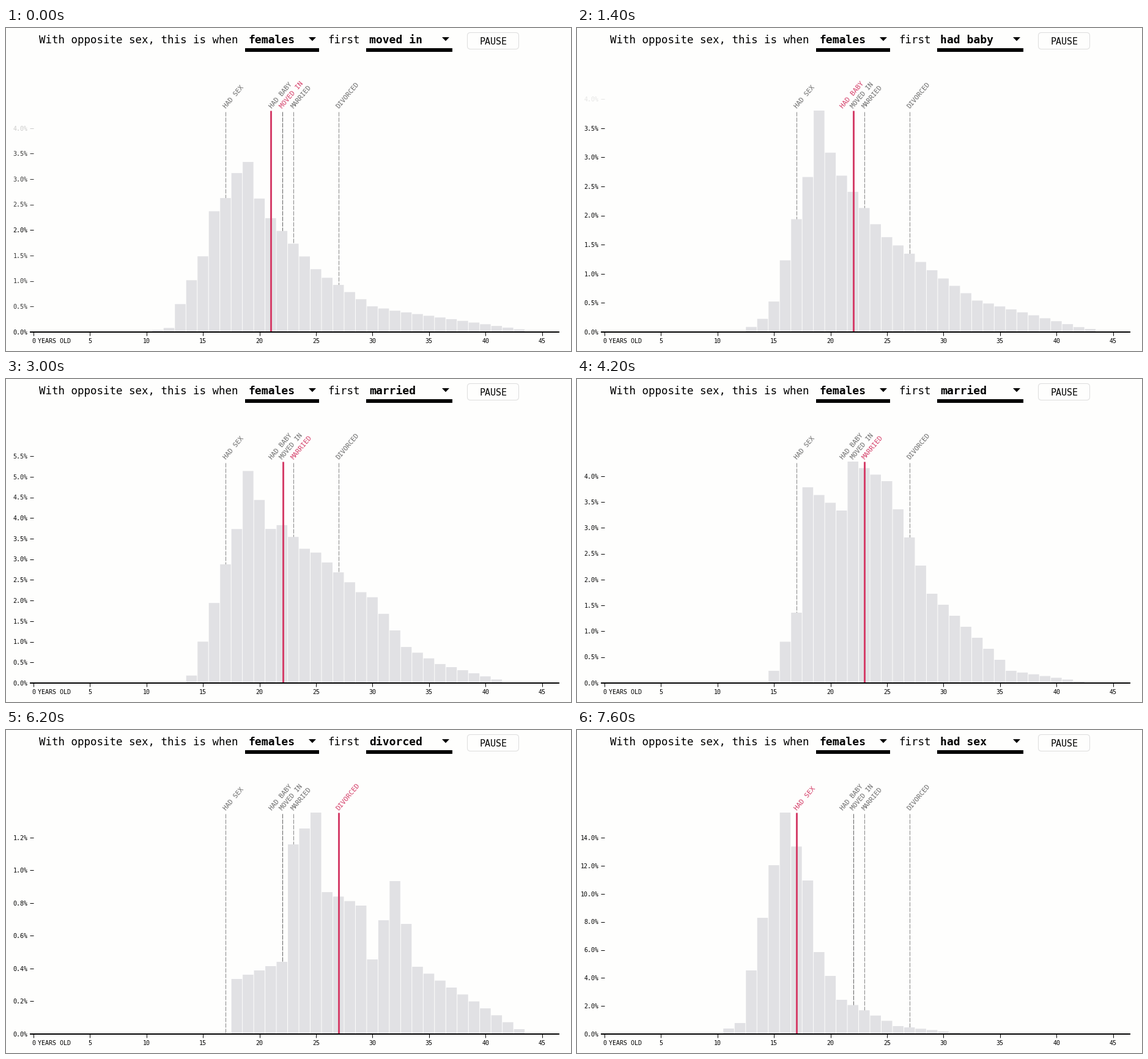
Recreate the animation shown at these times as a matplotlib script. Size 924 by 528 pixels, loop 8 s.

```python
import numpy as np
import matplotlib.pyplot as plt
from matplotlib.animation import FuncAnimation
from matplotlib.patches import FancyBboxPatch, Polygon, Rectangle

W, H, DPI = 924, 528, 100
PX = 72 / DPI                      # points per pixel
FRAME_MS, LOOP_MS = 200, 8000
FIRST_MS, STEP_MS, MOVE_MS, PAUSE_MS = -379, 1605, 600, 780
BASE, TOP, CLIP = 497, 135, 85     # axis, chart top, highest visible tick
MONO = "DejaVu Sans Mono"
PAPER, BAR, RED, GREY = "#fefefd", "#e1e1e4", "#d5406a", "#6c6c6c"
AGES = np.arange(48)


class Event:
    """A distribution whose bars follow a line through a few (age, height) points."""

    def __init__(self, name, age, peak, step, outline, shift=0):
        self.name, self.age, self.shift = name, age, shift
        self.scale = (BASE - TOP) / peak           # pixels per percent
        self.ticks = {round(v, 1) for v in np.arange(0, peak + 1e-6, step)}
        self.heights = np.interp(AGES, *zip(*outline), left=0, right=0)


EVENTS = [
    Event("had sex", 17, 15.8, 2,
          [(10, 0), (12, 18), (16, 362), (18, 251), (19, 134), (21, 56),
           (26, 13), (32, 0)]),
    Event("moved in", 22, 3.68, 0.5,
          [(12, 0), (15, 35), (17, 168), (19, 362), (20, 290), (25, 150),
           (30, 64), (43, 7)]),
    Event("had baby", 22, 5.505, 0.5,
          [(14, 17), (17, 225), (18, 225), (19, 362), (21, 240), (24, 172),
           (30, 145), (33, 53), (42, 0)], shift=-17),
    Event("married", 23, 4.284, 0.5,
          [(15, 20), (17, 115), (18, 320), (21, 282), (22, 362), (25, 330),
           (29, 146), (36, 20), (43, 0)]),
    Event("divorced", 27, 1.353, 0.2,
          [(18, 90), (22, 118), (23, 310), (25, 362), (26, 232), (29, 210),
           (30, 122), (32, 250), (34, 110), (43, 8)]),
]
# Evenly spaced moves, with a longer rest before returning to the first event
STARTS = FIRST_MS + STEP_MS * np.arange(len(EVENTS))
STARTS[-1] += PAUSE_MS


def age_x(age):
    return 45 + age * 18.478


def lerp(a, b, t):
    return a + (b - a) * t


def cubic_in_out(t):
    return 4 * t**3 if t < 0.5 else 1 - 4 * (1 - t)**3


fig = plt.figure(figsize=(W / DPI, H / DPI), dpi=DPI, facecolor=PAPER)
ax = fig.add_axes([0, 0, 1, 1])
ax.set(xlim=(0, W), ylim=(H, 0))
ax.axis("off")


def label(x, y, text, size, color="black", **kw):
    return ax.text(x, y, text, size=size * PX, color=color, family=MONO, **kw)


def stroke(xs, ys, width=1, color="black", **kw):
    kw.setdefault("solid_capstyle", "butt")
    return ax.plot(xs, ys, lw=width * PX, color=color, **kw)[0]


def dropdown(x, width, text):
    ax.add_patch(Rectangle((x, 33), width, 6, color="black", lw=0))
    tip = x + width - 11
    ax.add_patch(Polygon([(tip - 6, 15), (tip + 6, 15), (tip, 21.3)],
                         color="black", lw=0))
    return label(x + 5, 25, text, 18, weight="bold")


# Sentence and button
label(54.5, 25, "With opposite sex, this is when", 17.5)
label(526, 25, "first", 17.5)
dropdown(391, 121, "females")
choice = dropdown(589, 141, "")
ax.add_patch(FancyBboxPatch((754.5, 7.5), 84, 27, fc=PAPER, ec="#dddddd",
                            boxstyle="round,pad=0,rounding_size=5", lw=PX))
label(796.5, 27, "PAUSE", 15, ha="center")

# Horizontal axis
stroke([39, 905], [BASE, BASE], 2, zorder=5)
for age in range(0, 46, 5):
    stroke([age_x(age)] * 2, [BASE, BASE + 6], zorder=5)
    label(age_x(age), 515, str(age), 10, ha="center")
label(52.5, 515, "YEARS OLD", 10)

# Event markers
names = []
for event in EVENTS:
    x = age_x(event.age)
    stroke([x, x], [137, BASE], color="#555555", alpha=0.7, zorder=1,
           dashes=(7, 2), dash_capstyle="butt")
    names.append(label(x + 0.5 + event.shift, 132, event.name.upper(), 10.8,
                       rotation=50, rotation_mode="anchor"))

# Moving parts
bars = ax.bar(age_x(AGES) - 0.2, 0 * AGES, width=17.5, bottom=BASE,
              color=BAR, lw=0, zorder=2, snap=False)
marker = stroke([0, 0], [TOP, BASE], 3, RED, zorder=4, snap=True)
ticks = {}
for value in sorted(set().union(*(e.ticks for e in EVENTS))):
    ticks[value] = (label(35.3, 0, f"{value:.1f}%", 10, ha="right"),
                    stroke([39, 45], [0, 0]))


def place_ticks(old, new, p):
    for value, (text, dash) in ticks.items():
        alpha = lerp(value in old.ticks, value in new.ticks, p)
        y = BASE - value * lerp(old.scale, new.scale, p)
        visible = alpha > 0 and y >= CLIP
        text.set(y=y + 3.7, alpha=alpha, visible=visible)
        dash.set(ydata=[y, y], alpha=alpha, visible=visible)


def update(frame):
    now = frame * FRAME_MS
    stage = np.searchsorted(STARTS, now, side="right") - 1
    old, new = EVENTS[stage], EVENTS[(stage + 1) % len(EVENTS)]
    t = min((now - STARTS[stage]) / MOVE_MS, 1)
    p = cubic_in_out(t)

    choice.set_text(new.name)
    for event, text in zip(EVENTS, names):
        active = event is new
        text.set(color=RED if active else GREY,
                 size=(11.1 if active else 10.8) * PX)
    # Bars move at an even pace; the axis and the marker ease.
    for bar, height in zip(bars, lerp(old.heights, new.heights, t)):
        bar.set_height(-height)
    marker.set_xdata([age_x(lerp(old.age, new.age, p))] * 2)
    place_ticks(old, new, p)
    return []


anim = FuncAnimation(fig, update, frames=LOOP_MS // FRAME_MS,
                     interval=FRAME_MS, repeat=True, repeat_delay=0)
plt.show()
```
